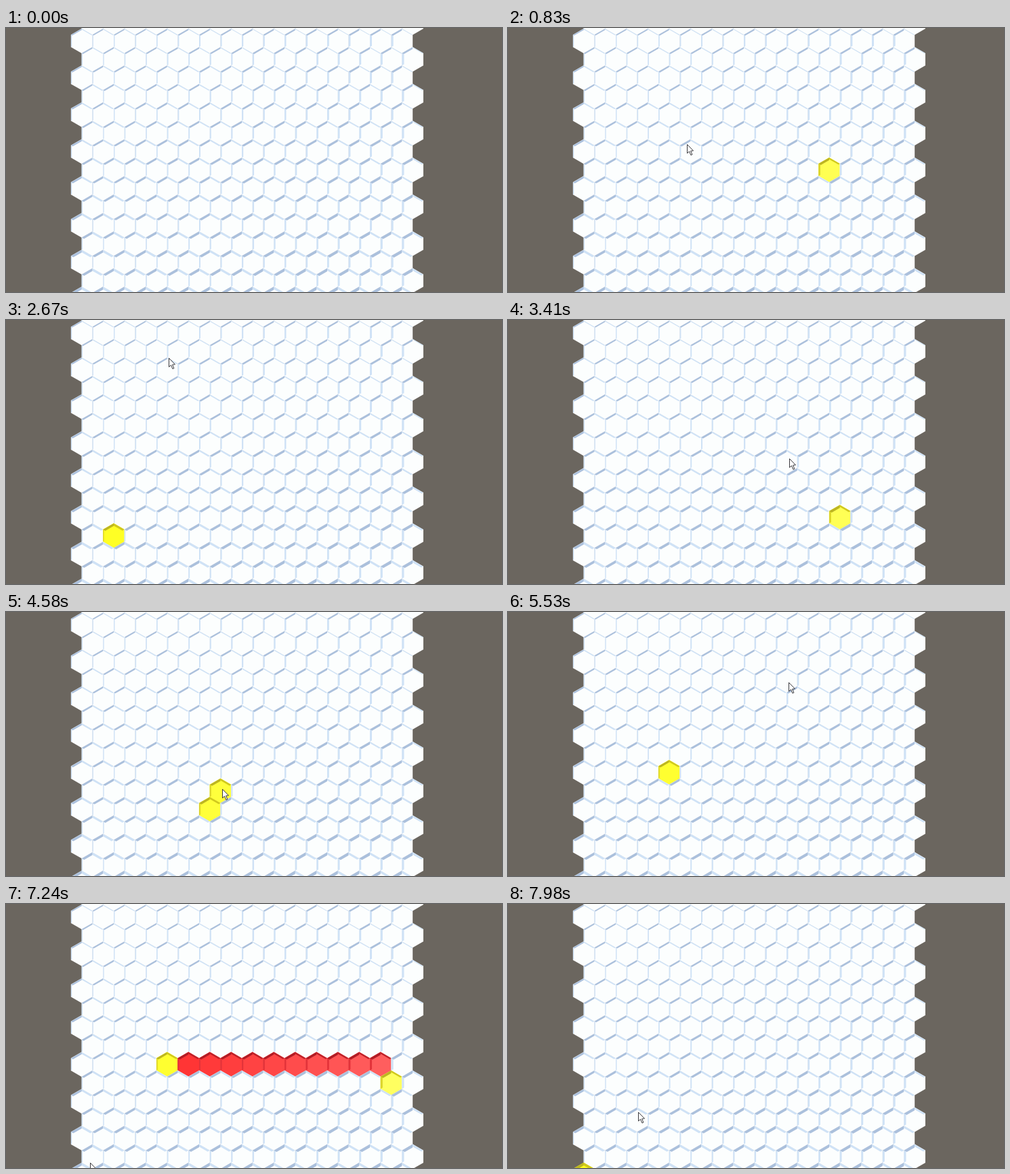
These frames come from a looping animation (732 by 391 pixels, 8000 ms). An HTML page with a canvas:

```html
<!DOCTYPE html>
<html lang="en">
<head>
<meta charset="utf-8">
<title>Hex grid path finding</title>
<style>
  html, body { margin: 0; height: 100%; overflow: hidden; background: #6b665f; }
  canvas { display: block; }
</style>
</head>
<body>
<canvas id="stage" width="732" height="391"></canvas>
<script>
const ctx = document.getElementById('stage').getContext('2d');
const LOOP = 8000, REST = 70;
const DX = 31.5, DY = 27.3, R = DX / Math.sqrt(3), X0 = 111.75, Y0 = 19.1;

// Wall colours: upper left, upper right, left
const SKINS = {
  plain: { face: () => '#fcfefe', walls: ['#abc0dc', '#cfe2f6', '#cfe2f6'] },
  end:   { face: k => `rgb(255,255,${k})`, walls: ['#bdb522', '#d0c81e', '#dcd42a'] },
  path:  { face: k => `rgb(255,${k},${k})`, walls: ['#b01d25', '#bd2229', '#e3333a'] }
};

// Pointer stops: arrival time, x, y
const STOPS = [
  [70, 677, 356], [440, 474, 205], [825, 264, 172], [1280, 160, 84], [1560, 161, 329],
  [1840, 161, 329], [2150, 106, 210], [2600, 240, 56], [2950, 488, 290], [3180, 488, 290],
  [3405, 415, 205], [3600, 390, 193], [3850, 300, 286], [4130, 300, 286], [4420, 319, 262],
  [4640, 319, 262], [5040, 263, 246], [5240, 238, 235], [5450, 400, 93], [5680, 626, 265],
  [5860, 569, 251], [6080, 569, 251], [6345, 329, 331], [6580, 215, 120], [6830, 134, 380],
  [7700, 111, 386], [7910, 111, 386], [7980, 192, 308]
];

// Clicks alternately pick a start and an end
const CLICKS = [440, 1600, 1840, 2980, 3180, 3930, 4130, 4440, 5240, 5860, 7730];

// Steps in cell units, in the order they are tried
const STEPS = [[-0.5, 1], [-1, 0], [1, 0], [0.5, 1], [0.5, -1], [-0.5, -1]];

const CELLS = [];
for (let r = -1; r < 15; r++) {
  for (let c = 0; c < 16; c++) CELLS.push([c + (r & 1) / 2, r]);
}

const mix = (a, b, u) => a + (b - a) * u;
const center = ([u, r]) => [X0 + DX * u, Y0 + DY * r];
const same = (a, b) => a[0] === b[0] && a[1] === b[1];

function distance(a, b) {
  const dr = Math.abs(a[1] - b[1]);
  return Math.max(dr, Math.abs(a[0] - b[0]) + dr / 2);
}

function pointerAt(t) {
  const i = STOPS.findIndex(s => s[0] > t);
  if (i < 0) return STOPS.at(-1).slice(1);
  if (i === 0) return null;
  const [t0, x0, y0] = STOPS[i - 1], [t1, x1, y1] = STOPS[i];
  const u = Math.max(0, (t - t0 - REST) / (t1 - t0 - REST));
  return [mix(x0, x1, u), mix(y0, y1, u)];
}

function cellAt([x, y]) {
  const gap = cell => {
    const [cx, cy] = center(cell);
    return Math.hypot(cx - x, cy - y);
  };
  return CELLS.reduce((best, cell) => gap(cell) < gap(best) ? cell : best);
}

// Walk greedily, always taking the first step that gets closer
function route(from, to) {
  const cells = [from];
  while (!same(from, to)) {
    from = STEPS.map(s => [from[0] + s[0], from[1] + s[1]])
      .find(next => distance(next, to) < distance(from, to));
    cells.push(from);
  }
  return cells;
}

const picked = CLICKS.map(t => cellAt(pointerAt(t)));

function markedAt(t) {
  const n = CLICKS.filter(c => c <= t).length;
  if (n === 0) return [];
  return n % 2 ? [picked[n - 1]] : route(picked[n - 2], picked[n - 1]);
}

function poly(points, fill) {
  ctx.beginPath();
  points.forEach(p => ctx.lineTo(...p));
  ctx.closePath();
  ctx.fillStyle = fill;
  ctx.fill();
}

function drawCell(cell, skin) {
  const [x, y] = center(cell);
  const at = (i, r) => {
    const a = (i * 60 - 90) * Math.PI / 180;
    return [x + r * Math.cos(a), y + r * Math.sin(a)];
  };
  poly([0, 1, 2, 3, 4, 5].map(i => at(i, R + 0.2)), skin.face(Math.round(14 + x * 0.145)));
  const wall = (i, width, color) => {
    const d = width * 1.155;
    poly([at(i, R), at(i + 1, R), at(i + 1, R - d), at(i, R - d)], color);
  };
  // Walls widen with the distance from the upper left
  wall(4, 0.8 + x * 0.004, skin.walls[2]);
  wall(0, Math.max(0.7, 1.2 + y * 0.006 - x * 0.0008), skin.walls[1]);
  wall(5, 1.5 + x * 0.0015 + y * 0.005, skin.walls[0]);
}

function drawGrid(t) {
  const marked = markedAt(t);
  for (const cell of CELLS) {
    const i = marked.findIndex(m => same(m, cell));
    const kind = i < 0 ? 'plain' : i === 0 || i === marked.length - 1 ? 'end' : 'path';
    drawCell(cell, SKINS[kind]);
  }
}

function drawPointer(t) {
  const tip = pointerAt(t);
  if (!tip) return;
  ctx.save();
  ctx.translate(Math.round(tip[0]) + 0.5, Math.round(tip[1]) + 0.5);
  poly([[0, 0], [0, 13], [3, 10.3], [5.4, 15.8], [7.4, 15], [5.1, 9.6], [9, 9.3]], '#fff');
  ctx.strokeStyle = '#3a3a3e';
  ctx.stroke();
  ctx.restore();
}

function draw(now) {
  const t = now % LOOP;
  ctx.fillStyle = '#6b665f';
  ctx.fillRect(0, 0, 732, 391);
  drawGrid(t);
  drawPointer(t);
}

let start;
function tick(now) {
  start ??= now;
  draw(now - start);
  requestAnimationFrame(tick);
}
draw(0);
requestAnimationFrame(tick);
</script>
</body>
</html>
```
